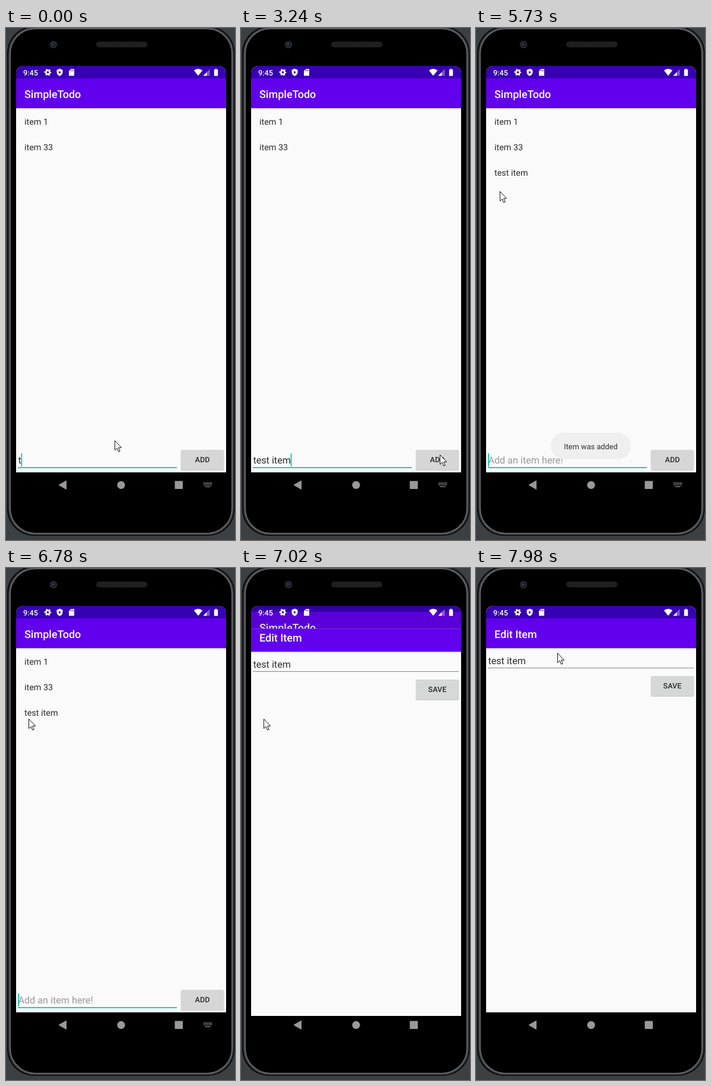
Recreate the animation shown at these times as an HTML page. Size 386 by 863 pixels, loop 8 s.

```html
<!DOCTYPE html>
<html lang="en">
<head>
<meta charset="utf-8">
<title>Todo app demo</title>
<style>
html, body { margin: 0; width: 100%; height: 100%; overflow: hidden; background: #3d4043; }
svg { display: block; width: 386px; height: 863px; font-family: Roboto, sans-serif; }
text { white-space: pre; text-rendering: geometricPrecision; }
.title { font-size: 18px; font-weight: 500; fill: #fff; }
.item { font-size: 14.4px; fill: #2b2b2b; }
.field { font-size: 16.2px; fill: #2b2b2b; }
.label { font-size: 12.6px; font-weight: 500; fill: #292929; text-anchor: middle; }
.hint { fill: #999; }
</style>
</head>
<body>
<svg viewBox="0 0 386 863">
  <defs>
    <linearGradient id="shade" x2="0" y2="1">
      <stop stop-opacity=".2"/><stop offset="1" stop-opacity="0"/>
    </linearGradient>
    <pattern id="mesh" width="3" height="3" patternUnits="userSpaceOnUse">
      <rect width="3" height="3" fill="#181818"/><path d="M0 3L3 0" stroke="#343434" stroke-width=".8"/>
    </pattern>
    <clipPath id="screen"><path d="M17 791V76a12 12 0 0 1 12-12H359a12 12 0 0 1 12 12V791Z"/></clipPath>
    <clipPath id="reveal"><rect id="window" x="17" width="354" height="791"/></clipPath>
    <g id="bars">
      <rect x="17" y="64" width="354" height="685" fill="#fafafa"/>
      <rect x="17" y="64" width="354" height="21" fill="#3700b3"/>
      <rect x="17" y="85" width="354" height="50" fill="#6200ee"/>
      <rect x="17" y="135" width="354" height="3" fill="url(#shade)"/>
    </g>
    <g id="button">
      <rect x="294.5" y="1" width="73" height="34" rx="2.5" fill="#000" opacity=".16"/>
      <rect x="295" width="72" height="33" rx="1.8"/>
    </g>
  </defs>

  <rect width="386" height="863" fill="#3d4043"/>
  <g fill="none">
    <rect x="2" y="-3" width="383.5" height="859" rx="45" fill="#08090a"/>
    <rect x="5.5" y="0" width="377" height="853" rx="43" stroke="#3a3c3f" stroke-width="3"/>
    <rect x="7" y="1.2" width="374" height="850.5" rx="42" stroke="#707275" stroke-width="1.6"/>
    <rect x="9" y="2.5" width="370" height="848" rx="40" fill="#000"/>
  </g>
  <circle cx="80" cy="28" r="6.3" fill="#27282b"/>
  <circle cx="80" cy="28" r="3.4" fill="#171c2c"/>
  <circle cx="79.4" cy="27.5" r="1.2" fill="#4a5888"/>
  <rect x="152.5" y="23.5" width="85.5" height="8.5" rx="4.2" fill="url(#mesh)" stroke="#242424"/>

  <g clip-path="url(#screen)">
    <g id="main">
      <use href="#bars"/>
      <text class="title" x="31" y="118">SimpleTodo</text>
      <text class="item" x="31" y="163">item 1</text>
      <text class="item" x="31" y="206">item 33</text>
      <text class="item" x="31" y="249" id="added">test item</text>
      <text class="field" x="20.4" y="734" id="input"></text>
      <rect x="20" y="740" width="268" height="2" fill="#1fcbb8"/>
      <rect id="caret" y="717" width="2" height="22" fill="#1fcbb8"/>
      <g id="add"><use href="#button" y="711"/><text class="label" x="331" y="732">ADD</text></g>
      <g id="toast">
        <rect x="126" y="682" width="135" height="45" rx="22.5" fill="#efefef"/>
        <text x="193.5" y="710" font-size="12.8" text-anchor="middle" fill="#303030">Item was added</text>
      </g>
    </g>
    <rect id="dim" x="17" y="64" width="354" height="685"/>
    <g id="edit" clip-path="url(#reveal)">
      <rect id="strip" x="17" y="749" width="354" height="25" fill="#fafafa"/>
      <g id="page">
        <use href="#bars"/>
        <text class="title" x="31" y="118">Edit Item</text>
        <text class="field" x="20.4" y="162">test item</text>
        <rect x="20" y="168" width="347" height="1" fill="#858585"/>
        <use href="#button" y="182" fill="#d6d7d7"/>
        <text class="label" x="331" y="203">SAVE</text>
      </g>
    </g>
  </g>

  <g fill="#fff">
    <text x="29" y="79.5" font-size="12.6" font-weight="500">9:45</text>
    <circle cx="70.5" cy="74.7" r="3.2" fill="none" stroke="#fff" stroke-width="2.6"/>
    <circle cx="70.5" cy="74.7" r="5" fill="none" stroke="#fff" stroke-width="1.8" stroke-dasharray="2.62" stroke-dashoffset="1.3"/>
    <path d="M90.5 68.6l5 2.1v3.6q0 4.6-5 6.6q-5-2-5-6.6v-3.6Z"/>
    <path d="M89 72.2v5l4-2.5Z" fill="#3700b3"/>
    <path d="M109.5 69H115v11.5h-9V72.5Z"/>
    <path d="M109.3 70.5v2.4m2-2.4v2.4m2-2.4v2.4" stroke="#3700b3" stroke-width=".9"/>
    <path d="M316.8 71.6q7.2-5.6 14.4 0L324 80.6Z"/>
    <path d="M343.5 69v11.5H332.5Z" opacity=".35"/>
    <path d="M338.4 74.4v6.1H332.5Z"/>
    <path d="M352.6 68.7h2.6v1.2h2v10.8h-6.4V69.9h1.8Z"/>
  </g>
  <g fill="#999">
    <path d="M89 770.3L101.5 763.2V777.4Z" stroke="#999" stroke-linejoin="round"/>
    <circle cx="194" cy="770.3" r="6.6"/>
    <rect x="284.5" y="763.5" width="13.5" height="13.5" rx="1"/>
    <path id="keys" d="M333 767.2h14.5M333 770h14.5M336 773.2h8.5" stroke="#999" stroke-width="1.7" stroke-dasharray="1.7 .8"/>
  </g>
  <path id="cursor" d="M.5.5V16.6L4.2 13.2 6.7 19.2 9.2 18.1 6.7 12.3H11.6Z" fill="#fff" stroke="#111"/>
</svg>
<script>
const $ = id => document.getElementById(id);
const set = (id, name, value) => $(id).setAttribute(name, value);
const move = (id, x, y) => set(id, 'transform', `translate(${x} ${y})`);
const ramp = (t, from, to) => Math.min(1, Math.max(0, (t - from) / (to - from)));
const smooth = p => p * p * (3 - 2 * p);

const LOOP = 8000, ADDED = 4440, PHRASE = 'test item';

// Pointer moves: start, end, target x, target y
const moves = [
  [2270, 2420, 320, 695], [2600, 3100, 335, 719], [3900, 4200, 326, 728],
  [4830, 5220, 2, 431], [5220, 5600, 40, 275], [5750, 6150, 56, 244],
  [6300, 6540, 38, 254], [7350, 7680, 147, 177], [7680, 7830, 137, 143]];

function drawPointer(t) {
  let x = 183, y = 695;
  for (const [from, to, toX, toY] of moves) {
    const p = smooth(ramp(t, from, to));
    x += (toX - x) * p;
    y += (toY - y) * p;
  }
  move('cursor', x, y);
}

function drawInput(t) {
  // Two bursts of four keys; the caret blinks after the latest edit.
  const keys = 1 + Math.floor(4 * ramp(t, 0, 540)) + Math.floor(4 * ramp(t, 1040, 1760));
  const text = t < ADDED ? PHRASE.slice(0, keys) : '';
  const edit = [0, 540, 1220, 1760, ADDED].findLast(e => e <= t);
  const input = $('input');
  input.textContent = text || 'Add an item here!';
  input.classList.toggle('hint', !text);
  set('caret', 'x', 20 + (text && input.getComputedTextLength()));
  set('caret', 'opacity', (t - edit) % 1000 < 500 ? 1 : 0);
}

function drawAdding(t) {
  const grey = 214 - 12 * ramp(t, 4200, ADDED) * ramp(t, 4950, 4700);
  set('add', 'fill', `rgb(${grey},${grey},${grey})`);
  set('added', 'opacity', t < ADDED ? 0 : 1);
  set('toast', 'opacity', ramp(t, 4540, 4800) * ramp(t, 6640, 6480));
}

// The edit page is uncovered from below, at a low frame rate.
function drawSlide(t) {
  const u = ramp(Math.floor(t / 120 - .5) * 120 + 60, 6825, 7165), left = 1 - u;
  move('main', 0, Math.round(-18 * smooth(u)));
  move('page', 0, Math.round(10.8 * left ** .7));
  set('window', 'y', 64 + 693 * left ** 3.4);
  set('dim', 'opacity', .1 * (1 - left ** 6));
  set('strip', 'opacity', Math.max(0, .5 - u) * .6);
  set('edit', 'opacity', u ? 1 : 0);
  set('keys', 'opacity', u ? 0 : 1);
}

function draw(t) {
  drawInput(t);
  drawAdding(t);
  drawSlide(t);
  drawPointer(t);
}

const start = performance.now();
function tick(now) {
  draw(Math.max(0, now - start) % LOOP);
  requestAnimationFrame(tick);
}
draw(0);
requestAnimationFrame(tick);
</script>
</body>
</html>
```
